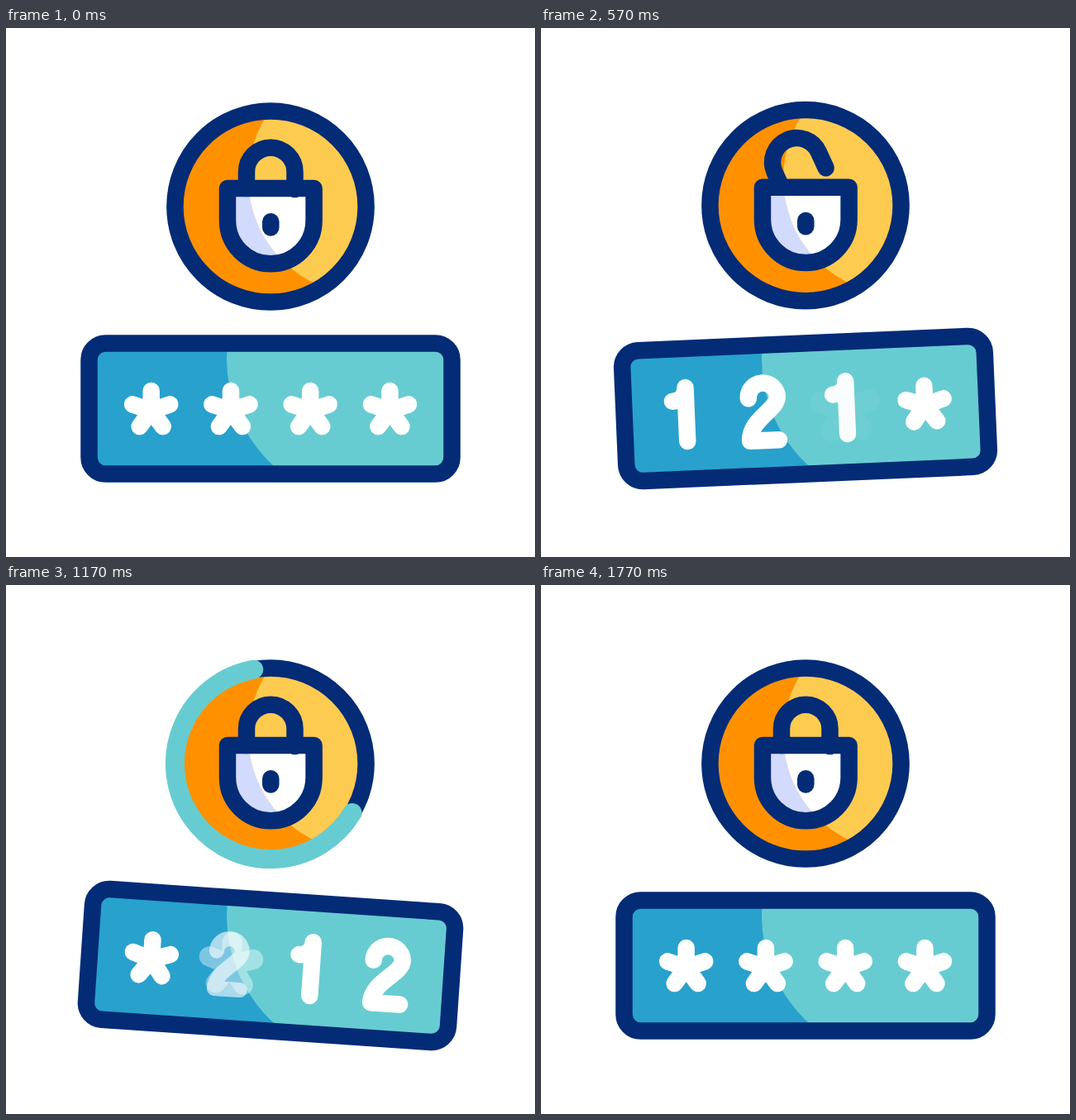
An HTML page for the animation above (2230 ms loop, 640 by 640 pixels).

```html
<!DOCTYPE html>
<html lang="en">
<head>
<meta charset="utf-8">
<title>Passcode lock</title>
<style>
  html, body { margin: 0; width: 100%; height: 100%; overflow: hidden; background: #fff; }
  svg { display: block; width: 100%; height: 100%; }
  .line { fill: none; stroke: #042b76; stroke-width: 20.5; stroke-linecap: round; stroke-linejoin: round; }
  .glyph { fill: none; stroke: #fff; stroke-width: 20.5; stroke-linecap: round; stroke-linejoin: round; }
</style>
</head>
<body>
<svg viewBox="0 0 640 640">
  <defs>
    <clipPath id="badgeLight"><circle cx="434" cy="182" r="140.8"/></clipPath>
    <clipPath id="panelLight"><circle cx="443.7" cy="400" r="176.7"/><path d="M443 223H640V640H443Z"/></clipPath>
    <circle id="disc" cx="320" cy="216" r="115.6"/>
    <path id="body" d="M268 194H372.6V233A52.3 52.3 0 0 1 268 233Z"/>
    <rect id="box" x="100.5" y="381.5" width="439" height="158" rx="20"/>
    <path id="star" d="M0 0V-23.8M0 0L22.6 -7.4M0 0L14 19.3M0 0L-14 19.3M0 0L-22.6 -7.4"/>
    <path id="one" d="M-16.2 -16.5C-7 -16.5 0 -23 0 -32.5V32.5"/>
    <path id="two" d="M-20.5 -16A17.5 17.5 0 0 1 14.5 -17C14.5 -1 -20 9 -20.5 35.5H14.5"/>
  </defs>

  <!-- The light areas are clipped in stage space, so their edge stays put while the parts move. -->
  <g class="badge">
    <use href="#disc" fill="#ff9100"/>
    <use href="#body" fill="#d2dbfd"/>
  </g>
  <g clip-path="url(#badgeLight)">
    <g class="badge">
      <use href="#disc" fill="#fdcb50"/>
      <use href="#body" fill="#fff"/>
    </g>
  </g>
  <g class="badge">
    <use href="#disc" class="line"/>
    <path id="arc" fill="none" stroke="#67ccd1" stroke-width="23" stroke-linecap="round"/>
    <path id="shackle" class="line" d="M291 194V174A29.25 29.25 0 0 1 349.5 174V195"/>
    <use href="#body" class="line"/>
    <path class="line" d="M320.3 234.3V241.5"/>
  </g>

  <g class="panel"><use href="#box" fill="#28a1cd"/></g>
  <g clip-path="url(#panelLight)">
    <g class="panel"><use href="#box" fill="#67ccd1"/></g>
  </g>
  <g class="panel">
    <use href="#box" class="line"/>
    <g id="code"></g>
  </g>
</svg>
<script>
const LOOP = 2230;
const SLOT = { x: 175.7, gap: 96.25, y: 461 };
const SWAP = { open: 2.4, close: 28.1, step: 4.95, length: 4.9 };

// Keys are [step, value] pairs, 30 steps per second.
const KEYS = {
  lift: [[0, 0], [9, 20], [24, -20], [33, 0]],
  tilt: [[11, 0], [26, -6.15], [33, 4.44], [49.7, 0]],
  shackle: [[0, 0], [25, -36], [34, 0]]
};

const $ = id => document.getElementById(id);
const badges = document.querySelectorAll('.badge');
const panels = document.querySelectorAll('.panel');

const ramp = (n, from, to) => Math.min(1, Math.max(0, (n - from) / (to - from)));
const ease = u => u * u * (3 - 2 * u);

function track(keys, n) {
  let value = keys[0][1];
  for (let i = 1; i < keys.length; i++) {
    const [a, from] = keys[i - 1], [b, to] = keys[i];
    if (n >= a) value = from + (to - from) * ramp(n, a, b);
  }
  return value;
}

function addGlyph(name) {
  const use = document.createElementNS('http://www.w3.org/2000/svg', 'use');
  use.setAttribute('href', '#' + name);
  use.setAttribute('class', 'glyph');
  $('code').append(use);
  return use;
}

const slots = ['one', 'two', 'one', 'two'].map((digit, i) => ({
  x: SLOT.x + SLOT.gap * i,
  nudge: i === 2 ? 1.5 : 0,
  star: addGlyph('star'),
  digit: addGlyph(digit)
}));

function place(el, x, y, scale, opacity) {
  el.setAttribute('transform', `translate(${x} ${y}) scale(${scale})`);
  el.setAttribute('opacity', opacity);
}

function drawSlot(slot, i, n) {
  const open = SWAP.open + SWAP.step * i;
  const close = SWAP.close + SWAP.step * i;
  const p = ramp(n, open, open + SWAP.length) - ramp(n, close, close + SWAP.length);
  const big = 1 + 0.3 * p, small = 0.7 + 0.3 * p;
  place(slot.star, slot.x, SLOT.y + 1.8 * big, big, 1 - p);
  place(slot.digit, slot.x + slot.nudge, SLOT.y + 0.3, small, p);
}

// Point on the ring, turned counter-clockwise from the top.
function ringPoint(turn) {
  const a = turn * 2 * Math.PI;
  return `${320 - 115.6 * Math.sin(a)} ${216 - 115.6 * Math.cos(a)}`;
}

function drawArc(n) {
  const head = ease(ramp(n, 24, 42)), tail = ease(ramp(n, 33, 53));
  const size = head - tail;
  if (size < 0.0001) return $('arc').setAttribute('d', '');
  const mid = (head + tail) / 2, sweep = 'A115.6 115.6 0 0 0 ';
  $('arc').setAttribute('d', 'M' + ringPoint(tail) + sweep + ringPoint(mid) + sweep + ringPoint(head));
}

function draw(n) {
  const lift = `translate(0 ${track(KEYS.lift, n)})`;
  const tilt = `rotate(${track(KEYS.tilt, n)} 320 460.5)`;
  badges.forEach(el => el.setAttribute('transform', lift));
  panels.forEach(el => el.setAttribute('transform', tilt));
  $('shackle').setAttribute('transform', `rotate(${track(KEYS.shackle, n)} 291 194)`);
  drawArc(n);
  slots.forEach((slot, i) => drawSlot(slot, i, n));
}

// Steps begin on multiples of 10 ms.
const stepAt = ms => Math.floor((Math.floor(ms / 10) * 10 + 4) * 0.03);

const start = performance.now();
function tick() {
  draw(stepAt((performance.now() - start) % LOOP));
  requestAnimationFrame(tick);
}
draw(0);
requestAnimationFrame(tick);
</script>
</body>
</html>
```
